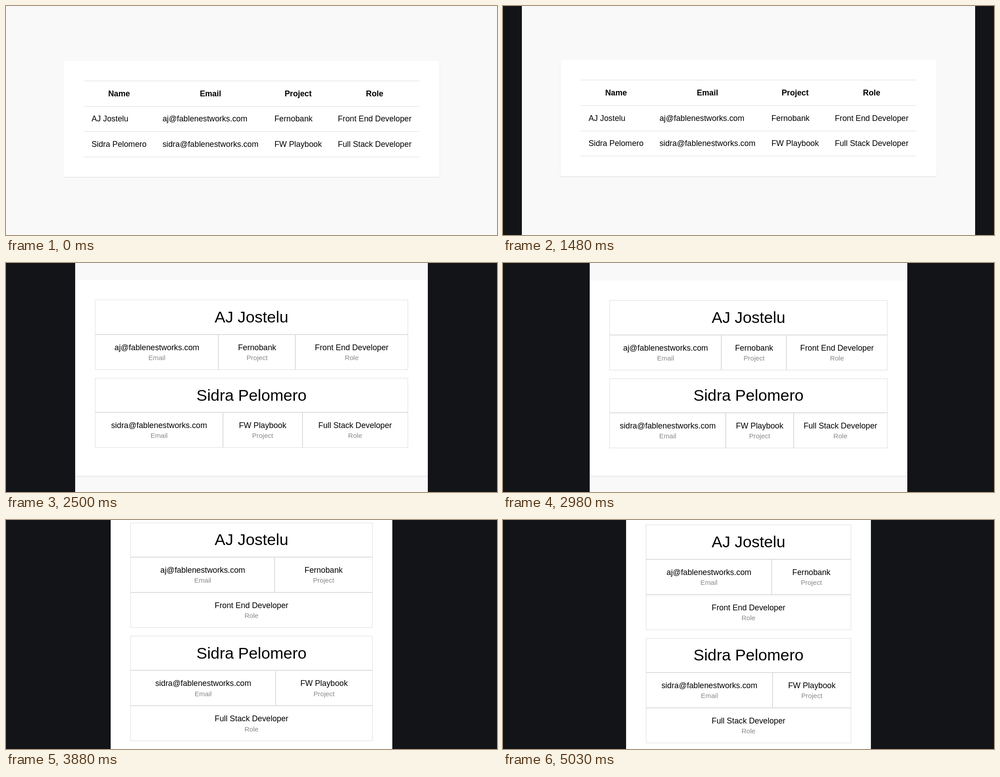
An HTML page for the animation above (6210 ms loop, 1093 by 512 pixels).

```html
<!DOCTYPE html>
<html lang="en">
<head>
<meta charset="utf-8">
<title>Responsive table</title>
<style>
  html { font-size: 17.78px; }
  html, body { margin: 0; width: 100%; height: 100%; overflow: hidden; }
  #stage { position: relative; width: 1093px; height: 512px; overflow: hidden; background: #131418; }
  #page {
    position: absolute; top: 0; height: 512px; overflow: hidden; background: #f9f9f9;
    display: flex; align-items: center; justify-content: center;
  }
  #card {
    position: relative; flex: none; box-sizing: border-box; padding: 2.5rem;
    background: #fff; border-radius: 2px; box-shadow: 0 1px 2px rgba(0, 0, 0, .13);
    font: 1rem/1.125 Arial, "Liberation Sans", sans-serif; color: #000; white-space: nowrap;
  }
  table { border-spacing: 0; }
  th, td { padding: 1rem; border-top: 1px solid #ddd; }
  tbody tr:last-child td { border-bottom: 1px solid #ddd; }

  .narrow #card { width: 100%; }
  .narrow table, .narrow tbody { display: block; }
  .narrow thead { display: none; }
  .narrow tr { display: flex; flex-wrap: wrap; margin-bottom: 1rem; }
  .narrow tbody td {
    flex: 1 1 auto; box-sizing: border-box; border: 1px solid #ddd; text-align: center;
  }
  .narrow td:first-child { flex-basis: 100%; font-size: 2rem; }
  .narrow td[data-label]::after {
    content: attr(data-label); display: block; padding-top: .25rem;
    font-size: .85rem; line-height: .96rem; color: #888;
  }
</style>
</head>
<body>
<div id="stage">
  <div id="page">
    <div id="card">
      <table>
        <thead>
          <tr><th>Name</th><th>Email</th><th>Project</th><th>Role</th></tr>
        </thead>
        <tbody>
          <tr>
            <td>AJ Jostelu</td>
            <td data-label="Email">aj@fablenestworks.com</td>
            <td data-label="Project">Fernobank</td>
            <td data-label="Role">Front End Developer</td>
          </tr>
          <tr>
            <td>Sidra Pelomero</td>
            <td data-label="Email">sidra@fablenestworks.com</td>
            <td data-label="Project">FW Playbook</td>
            <td data-label="Role">Full Stack Developer</td>
          </tr>
        </tbody>
      </table>
    </div>
  </div>
</div>
<script>
  const LOOP = 6210, STAGE = 1093, BREAKPOINT = 850;
  const STEP = 68.6, DRAGS = [990, 3810, 4210];
  const page = document.getElementById('page');
  const card = document.getElementById('card');

  // Time, left edge of the page, vertical drift of the card
  const keys = [
    [0, 0, -3.6], [789, 0, -3.6], [790, 0, -7], [990, 1, -7], [1200, 10, -6.5],
    [1480, 43, -5.2], [2090, 120, 0], [2980, 193, 1.6], [3540, 228, 2.8], [3800, 228, 2.8],
    [3880, 233, 2.9], [4200, 233, 2.9], [4420, 242, 4], [5030, 274, 7.7], [LOOP, 274, 7.7]
  ];

  // Each drag advances in even steps from its start
  function snap(t) {
    const start = DRAGS.filter(d => d <= t).pop();
    return start ? start + STEP * Math.floor((t - start) / STEP + .1) : t;
  }

  function sample(t) {
    const i = keys.findIndex(k => k[0] > t);
    const a = keys[i - 1], b = keys[i], p = (t - a[0]) / (b[0] - a[0]);
    return a.map((v, j) => v + (b[j] - v) * p);
  }

  function draw(time) {
    const t = time % LOOP;
    const [, edge, drift] = sample(t < DRAGS[0] ? Math.min(t, 790) : Math.min(snap(t), LOOP - 1));
    const left = Math.round(edge), width = STAGE - 2 * left;
    page.style.left = left + 'px';
    page.style.width = width + 'px';
    page.className = width < BREAKPOINT ? 'narrow' : '';
    card.style.top = drift + 'px';
  }

  const origin = performance.now();
  function loop() {
    draw(performance.now() - origin);
    requestAnimationFrame(loop);
  }
  loop();
</script>
</body>
</html>
```
